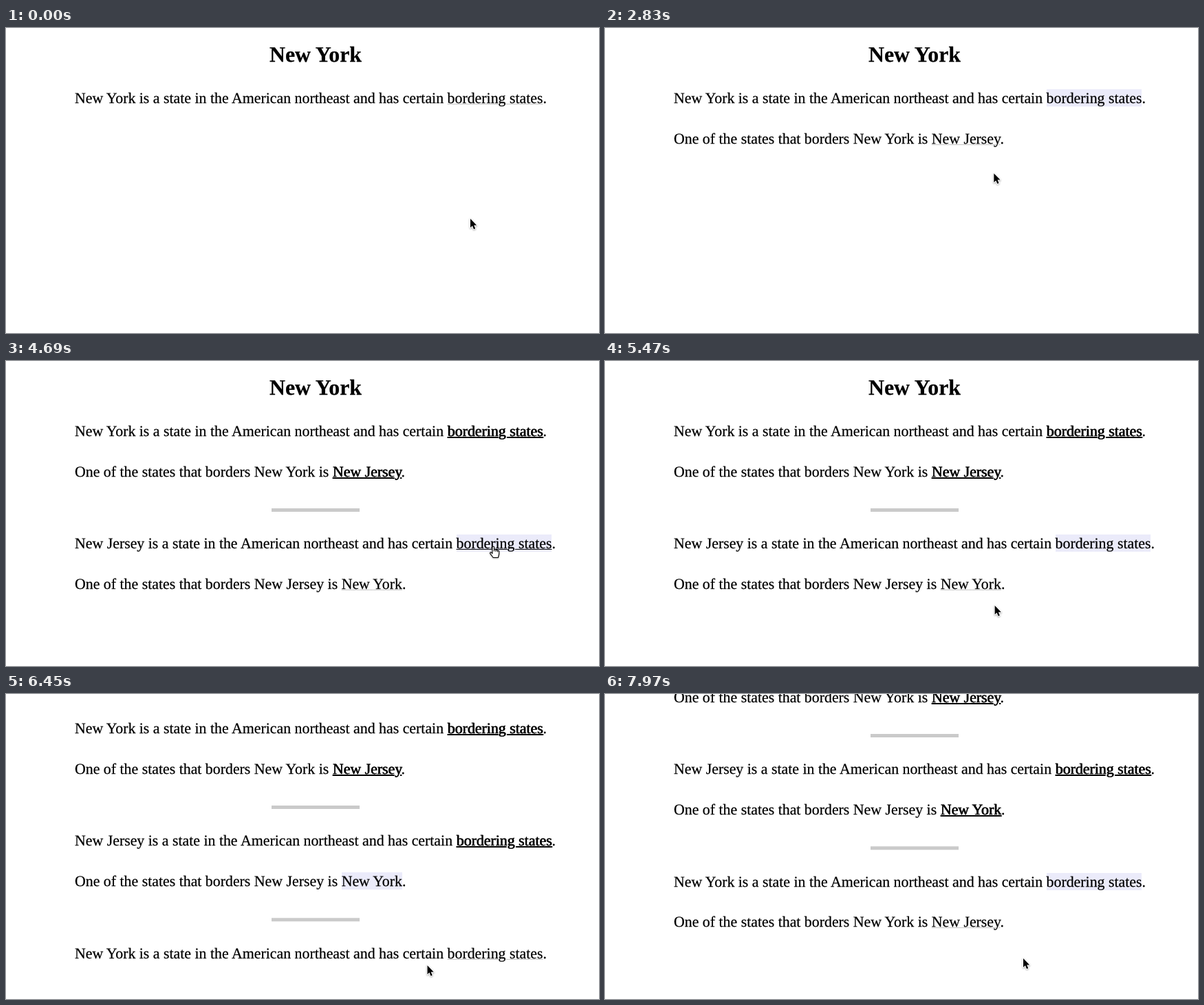
An HTML page that plays this animation: 862x443 px, repeating every 8000 ms.

```html
<!DOCTYPE html>
<html lang="en">
<head>
<meta charset="utf-8">
<title>Bordering states</title>
<style>
  html, body { margin: 0; width: 100%; height: 100%; overflow: hidden; background: #fff; }
  body {
    position: relative; color: #000;
    font: 21.85px/26px "Liberation Serif", "Times New Roman", serif;
    text-rendering: geometricPrecision;
    -webkit-text-stroke: .25px #000;
  }
  #page { position: absolute; left: 0; top: 0; width: 862px; }
  h1 {
    position: absolute; left: 100px; top: 21px; width: 700px; margin: 0;
    font-size: 31.8px; line-height: 35px; text-align: center;
  }
  p { position: absolute; left: 100px; margin: 0; white-space: pre; }
  .kern { letter-spacing: -.05em; }
  hr { position: absolute; left: 386px; top: 0; width: 128px; height: 5px; margin: 0; border: 0; background: #cacaca; }
  a {
    padding-top: 1px;
    text-decoration: underline 1px #c4c4c4;
    text-underline-offset: 1px;
  }
  a.active { background: #ebebfa; text-decoration-color: transparent; }
  a.hover { text-decoration-color: #000; }
  a.done { background: none; text-decoration: underline 2px #000; text-shadow: .7px 0 #000; }
  #cursor { position: absolute; left: 0; top: 0; overflow: visible; filter: drop-shadow(0 1px 1px #0005); }
</style>
</head>
<body>
<div id="page"><h1>New York</h1></div>
<svg id="cursor" width="1" height="1">
  <path id="arrow" d="M0 0V13L2.9 10.3 5 15.2 7.2 14.2 5.2 9.4H9.2Z"
        stroke="#fff" stroke-width="2" stroke-linejoin="round" paint-order="stroke"/>
  <path id="hand" fill="#fff" stroke="#000" stroke-width="1.1" stroke-linejoin="round"
        d="M-2 8.5V1.6a1.3 1.3 0 0 1 2.6 0V7V5.6a1.2 1.2 0 0 1 2.5 0V7.4V6.4a1.2 1.2 0 0 1 2.4 .2V8V7.4a1.1 1.1 0 0 1 2.2 .3V11.5L6.4 16.5H-.8L-5.2 10.6q-.6-1.9 1.2-1.7L-2 10.6Z"/>
  <path id="beam" fill="none" stroke="#000" stroke-width="1.1"
        d="M-3.5 -8Q0 -8 0 -6Q0 -8 3.5 -8M0 -6V6M-3.5 8Q0 8 0 6Q0 8 3.5 8M-2 3.5H2"/>
</svg>
<script>
const LOOP = 8000;
const ROWS = 6;
const page = document.getElementById('page');
const cursor = document.getElementById('cursor');
const shapes = ['arrow', 'hand', 'beam'].map(id => document.getElementById(id));

// The link of each row is clicked in turn and reveals the next row.
const clicks = [2280, 3550, 4690, 6000, 7280];
const scrolls = [
  { start: clicks[3] - 15, by: 52 },
  { start: clicks[4] - 15, by: 104 },
];
const SCROLL_TIME = 290;

// The pointer rests at each place until the next move; its path sags by a share of the distance.
const home = { x: 675, y: 277 };
const moves = [
  { start: 1365, end: 1960, x: 683, y: 104, sag: 0 },
  { start: 2535, end: 3130, x: 525, y: 168, sag: .91 },
  { start: 3745, end: 4510, x: 709, y: 269, sag: .88 },
  { start: 5045, end: 5720, x: 542, y: 330, sag: .67 },
  { start: 6270, end: 6900, x: 682, y: 383.5, sag: .64 },
  { start: 7715, end: 7970, x: 608, y: 384, sag: .25 },
];

const clamp01 = u => Math.min(1, Math.max(0, u));

function add(tag, parent, html = '') {
  const el = document.createElement(tag);
  // Tighten the space before a slanted capital.
  el.innerHTML = html.replace(/ (?=[AY])/g, '<span class="kern"> </span>');
  return parent.appendChild(el);
}

function makeRow(i) {
  const pair = Math.floor(i / 2), isAnswer = i % 2 === 1;
  const states = ['New York', 'New Jersey'];
  const here = states[pair % 2], there = states[(pair + 1) % 2];
  const y = 89 + 163.3 * pair + (isAnswer ? 58.7 : 0);
  const parts = [];

  if (pair && !isAnswer) {
    const rule = add('hr', page);
    rule.style.transform = `translateY(${y - 38.3}px)`;
    parts.push(rule);
  }
  const line = add('p', page, isAnswer
    ? `One of the states that borders ${here} is `
    : `${here} is a state in the American northeast and has certain `);
  const top = Math.round(y);
  line.style.top = top + 'px';
  parts.push(line);
  const a = add('a', line, isAnswer ? there : 'bordering states');
  line.append('.');

  const left = 100 + a.offsetLeft;
  return {
    parts, a, top, left, right: left + a.offsetWidth, end: 100 + line.offsetWidth,
    shownAt: i ? clicks[i - 1] : 0,
    clickAt: clicks[i] ?? Infinity,
    doneAt: clicks[i + 1] ?? Infinity,
  };
}

const rows = Array.from({ length: ROWS }, (_, i) => makeRow(i));

function pointerAt(t) {
  const i = moves.findLastIndex(m => t >= m.start);
  if (i < 0) return home;
  const a = moves[i - 1] ?? home, b = moves[i];
  const u = clamp01((t - b.start) / (b.end - b.start));
  const s = 1 - (1 - u) ** 1.5;
  const dx = b.x - a.x;
  const bend = { x: (a.x + b.x) / 2 + .22 * dx, y: (a.y + b.y) / 2 + b.sag * Math.abs(dx) };
  const curve = k => (1 - s) ** 2 * a[k] + 2 * s * (1 - s) * bend[k] + s * s * b[k];
  return { x: curve('x'), y: curve('y') };
}

const sumScrolls = progress => scrolls.reduce((sum, s) => sum + s.by * progress(s), 0);
const scrollAt = t => Math.round(sumScrolls(s => clamp01((t - s.start) / SCROLL_TIME)));
// Hover is only re-evaluated once a scroll has ended.
const settledScroll = t => sumScrolls(s => t >= s.start + SCROLL_TIME - 15 ? 1 : 0);

function draw(t) {
  const { x, y } = pointerAt(t);
  const pageY = y + settledScroll(t);
  let shape = 'arrow';

  for (const row of rows) {
    const shown = t >= row.shownAt;
    const inside = shown && pageY >= row.top && pageY < row.top + 25 && x >= 100 && x < row.end;
    const hover = inside && x >= row.left && x < row.right;
    if (inside) shape = hover ? 'hand' : 'beam';
    for (const part of row.parts) part.style.visibility = shown ? 'visible' : 'hidden';
    row.a.classList.toggle('hover', hover);
    row.a.classList.toggle('active', t >= row.clickAt);
    row.a.classList.toggle('done', t >= row.doneAt);
  }

  page.style.top = -scrollAt(t) + 'px';
  cursor.style.transform = `translate(${x}px, ${y}px)`;
  for (const s of shapes) s.style.display = s.id === shape ? 'inline' : 'none';
}

const start = performance.now();
function tick() {
  draw((performance.now() - start) % LOOP);
  requestAnimationFrame(tick);
}
tick();
</script>
</body>
</html>
```
